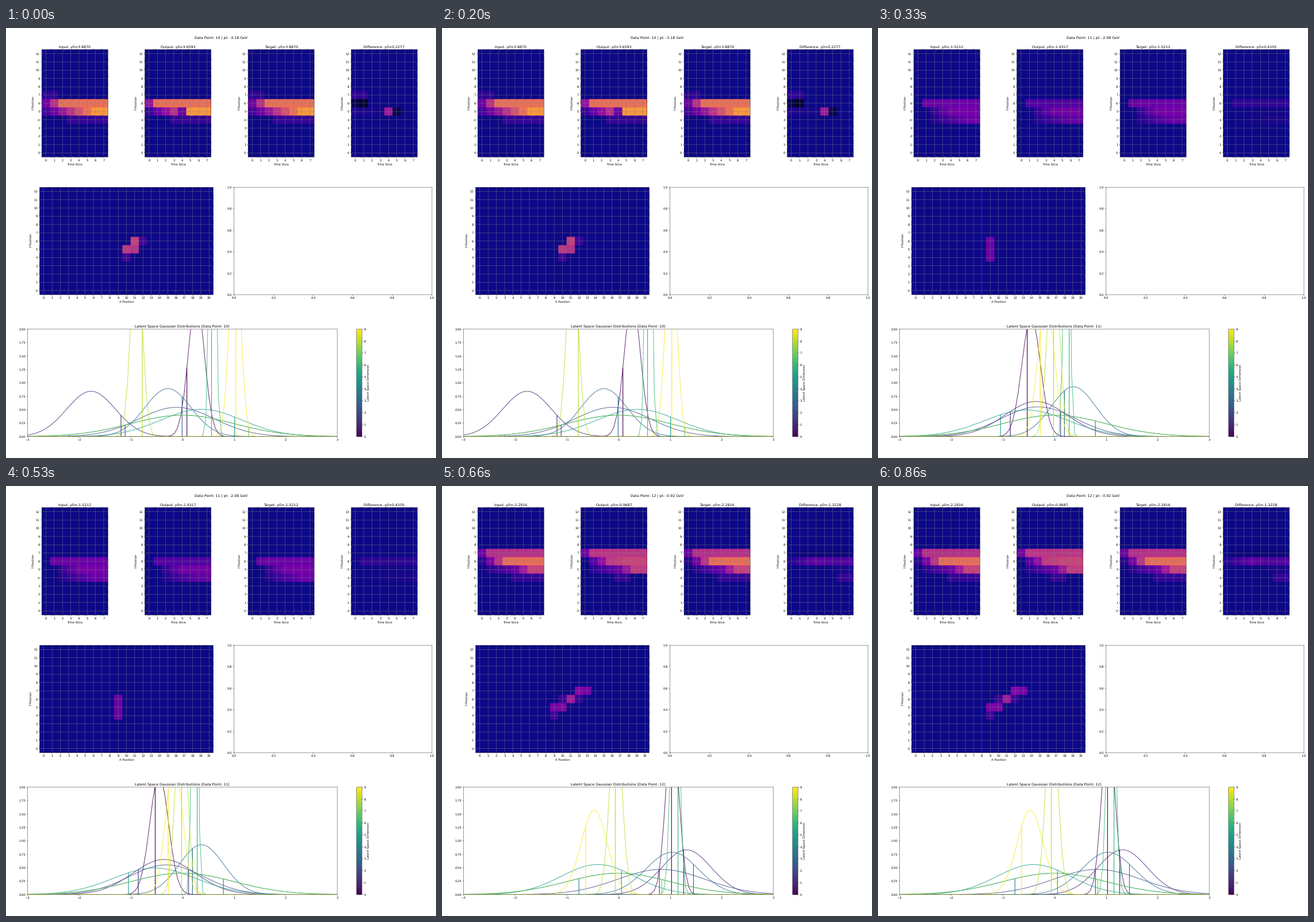
These frames come from a looping animation (748 px wide and 748 px high, 990 ms). A matplotlib script:

```python
import numpy as np
import matplotlib.pyplot as plt
from matplotlib.animation import FuncAnimation
from matplotlib.cm import ScalarMappable
from matplotlib.collections import PolyCollection
from matplotlib.colors import ListedColormap, Normalize

SIZE, DPI = 748, 37.4
ROWS, SLICES, COLS = 13, 8, 21
CELL = 14.375
HEIGHT = ROWS * CELL

plt.rcParams.update({"path.snap": False, "text.hinting": "none",
                     "font.family": "DejaVu Sans"})

# Plasma for positive values, fading to black below zero.
plasma = plt.get_cmap("plasma")(np.linspace(0, 1, 256))[:, :3]
charge = ListedColormap(np.vstack([np.outer(np.linspace(0, 1, 256), plasma[0]), plasma]))
viridis = plt.get_cmap("viridis")

# seen, out: row -> (time, charge) key points, linear in between.
# track: start, end and total charge of the particle's path.
# latent: (mean, sigma, sample) per dimension; inactive ones stay at the prior.
PRIOR = (0, 1)
EVENTS = [
    dict(number=10, pt=-3.18, y0=3.8870, y0_out=3.6593,
         seen={7: [(1, .06), (2, 0)], 6: [(-1, 0), (2, .64)],
               5: [(-1, 0), (6, .76)], 4: [(2, 0), (3, .07)]},
         out={6: [(-1, 0), (1, .64)], 5: [(0, .08), (3, .42), (4, .2), (5, .76)],
              4: [(2, 0), (3, .07)]},
         track=((9.9, 4.4), (11.6, 6.15), 1.52),
         latent=[(.27, .155, .087), (-1.77, .472, -1.19), (-.11, .732, -1.11),
                 (-.28, .446, -.005), (*PRIOR, -2.2), (.37, .785, 1.01),
                 (.585, .052, .565), (*PRIOR, 1.285), (-.89, .108, -.777),
                 (1.02, .108, 1.035)]),
    dict(number=11, pt=-2.08, y0=-1.5212, y0_out=-1.9317,
         seen={6: [(0, 0), (1, .2)], 5: [(1, 0), (4, .23)], 4: [(1, 0), (6, .2)]},
         out={6: [(0, 0), (1, .14)], 5: [(1, 0), (4, .22)], 4: [(1, 0), (6, .18)]},
         track=((9, 3.5), (9, 6.5), .64),
         latent=[(-.45, .178, -.527), (-.355, .61, -.855), (-.31, .72, .12),
                 (.37, .429, .195), (*PRIOR, .795), (-.54, .806, -1.045),
                 (.24, .047, .287), (*PRIOR, 3.2), (-.02, .11, -.015),
                 (-.16, .157, -.275)]),
    dict(number=12, pt=-0.92, y0=-2.29156, y0_out=-0.96874,
         seen={7: [(-1, 0), (1, .42)], 6: [(0, .04), (3, .63)],
               5: [(0, 0), (4, .2), (6, .48)], 4: [(3, 0), (4, .07)]},
         out={7: [(-1, 0), (1, .44)], 6: [(0, 0), (3, .45), (5, .49)],
              5: [(0, 0), (4, .2), (6, .46)], 4: [(3, 0), (4, .07), (5, .07), (6, 0)]},
         track=((8.5, 4.3), (13.15, 7.49), 1.6),
         latent=[(1.045, .128, 1.03), (1.32, .478, 1.265), (.83, .85, .795),
                 (1.04, .505, 1.455), (*PRIOR, -.765), (-.4, .712, .06),
                 (1.1, .075, 1.155), (*PRIOR, .84), (-.05, .115, -.06),
                 (-.47, .2525, -.635)]),
]


def pulse_map(rows):
    """Charge over time, one profile per row."""
    grid = np.zeros((ROWS, SLICES))
    for y, keys in rows.items():
        grid[y] = np.interp(np.arange(SLICES), *zip(*keys))
    return grid


def track_map(start, end, total, n=2000):
    """Charge left in each cell by a straight path."""
    x, y = np.linspace(start, end, n).T
    edges = np.arange(ROWS + 1) - 0.5, np.arange(COLS + 1) - 0.5
    return np.histogram2d(y, x, bins=edges)[0] * total / n


def difference(seen, out):
    """Losses are stretched so that they show as dark cells."""
    gap = seen - out
    return np.where(gap < 0, np.maximum(4 * gap, -0.65), gap)


def pdf(x, mean, sigma):
    return np.exp(-((x - mean) / sigma) ** 2 / 2) / (sigma * np.sqrt(2 * np.pi))


fig = plt.figure(figsize=(SIZE / DPI, SIZE / DPI), dpi=DPI, facecolor="white")


def panel(left, top, width):
    """Add axes placed in pixels from the top left corner."""
    return fig.add_axes([left / SIZE, 1 - (top + HEIGHT) / SIZE,
                         width / SIZE, HEIGHT / SIZE])


def cell(x, y, cols):
    """A cell reaching under its right and lower neighbours, to hide seams."""
    right, low = min(x + 1, cols - 0.5), max(y - 1, -0.5)
    return [(x - 0.5, y + 0.5), (right, y + 0.5), (right, low), (x - 0.5, low)]


class HeatPanel:
    def __init__(self, left, top, cols, xlabel):
        self.ax = panel(left, top, cols * CELL)
        self.cells = PolyCollection(
            [cell(x, y, cols) for y in reversed(range(ROWS)) for x in range(cols)],
            cmap=charge, norm=Normalize(-1, 1), edgecolors="none", clip_on=False)
        self.ax.add_collection(self.cells, autolim=False)
        self.ax.set(xlim=(-0.5, cols - 0.5), ylim=(-0.5, ROWS - 0.5),
                    xticks=range(cols), yticks=range(ROWS),
                    xlabel=xlabel, ylabel="Y Position")
        self.ax.grid(True, color="gray", linewidth=0.8)

    def show(self, grid):
        self.cells.set_array(grid[::-1].ravel())


heading = fig.suptitle("")
names = ["Input", "Output", "Target", "Difference"]
slices = [HeatPanel(62.2 + 179.45 * i, 37.5, SLICES, "Time Slice") for i in range(4)]
plane = HeatPanel(58.6, 277.1, COLS, "X Position")
panel(396.7, 277.1, 344.3)

latent_ax = panel(37.6, 523.9, 538.5)
latent_ax.set(xlim=(-3, 3), ylim=(0, 2), yticks=np.arange(0, 2.1, 0.25))
xs = np.linspace(-3, 3, 100)
curves, stems = [], []
for dim in range(10):
    color = viridis(dim / 9)
    curves += latent_ax.plot([], [], color=color, lw=2, alpha=0.8)
    stems += latent_ax.plot([], [], color=color, lw=2.2, solid_capstyle="butt")

bar = fig.colorbar(ScalarMappable(Normalize(0, 9), viridis),
                   cax=panel(609.8, 523.9, HEIGHT / 20), ticks=range(10))
bar.set_label("Latent Space Dimension")


def update(i):
    event = EVENTS[i]
    number, y0, y0_out = event["number"], event["y0"], event["y0_out"]
    heading.set_text(f"Data Point: {number} | pt: {event['pt']:.2f} GeV")
    seen, out = pulse_map(event["seen"]), pulse_map(event["out"])
    grids = [seen, out, seen, difference(seen, out)]
    offsets = [y0, y0_out, y0, y0 - y0_out]
    for heat, name, grid, offset in zip(slices, names, grids, offsets):
        heat.show(grid)
        heat.ax.set_title(f"{name}. y0={offset:.4f}")
    plane.show(track_map(*event["track"]))
    latent_ax.set_title(f"Latent Space Gaussian Distributions (Data Point: {number})")
    for curve, stem, (mean, sigma, z) in zip(curves, stems, event["latent"]):
        curve.set_data(xs, pdf(xs, mean, sigma))
        stem.set_data([z, z], [0, pdf(z, mean, sigma)])
    return [heading, *curves, *stems]


anim = FuncAnimation(fig, update, frames=len(EVENTS), interval=330,
                     repeat=True, repeat_delay=0, blit=False)
plt.show()
```
